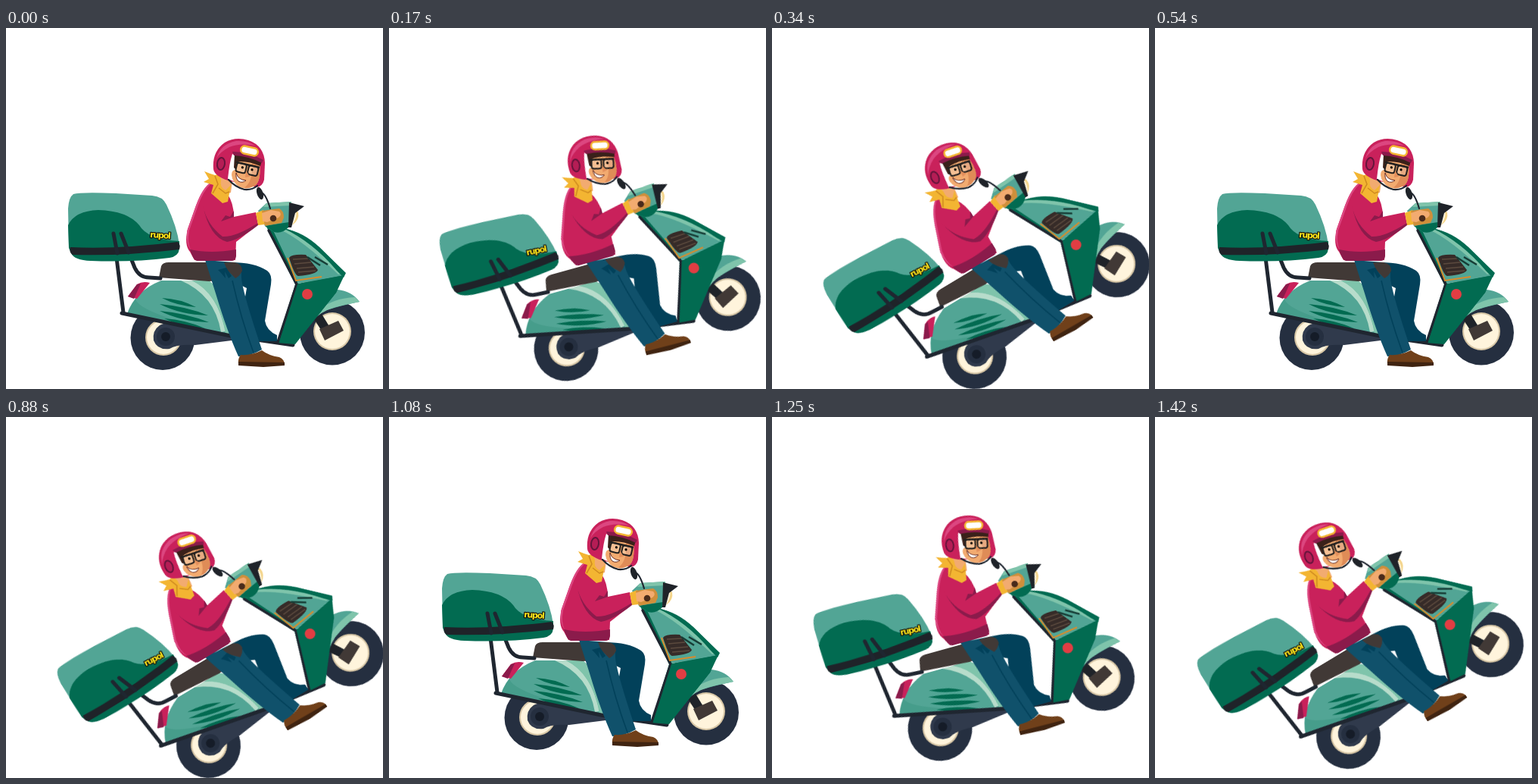
An HTML page that plays this animation: 498x476 px, repeating every 1.62 s.

```html
<!DOCTYPE html>
<html lang="en">
<head>
<meta charset="utf-8">
<title>Delivery scooter</title>
<style>
  html, body { margin: 0; width: 100%; height: 100%; overflow: hidden; background: #fff; }
  svg { display: block; width: 498px; height: 476px; }
  .light { fill: #52a595; } .green { fill: #026b51; } .pale { fill: #7fc4ab; }
  .tyre { fill: #252f40; } .black { fill: #1f2329; } .cream { fill: #fff4dc; }
  .seat { fill: #413936; } .pink { fill: #c9215b; } .plum { fill: #8b1b4b; }
  .rose { fill: #dc4680; } .jeans { fill: #10516b; } .navy { fill: #02415a; }
  .gold { fill: #f3b532; } .skin { fill: #f2ab70; } .tan { fill: #cf8f3b; }
  .line { fill: none; stroke: #1f2630; stroke-width: 5; stroke-linejoin: round; stroke-linecap: round; }
  text { font: 900 11px "DejaVu Sans", sans-serif; fill: #ffe71a; stroke: #16180f; stroke-width: 2.4; paint-order: stroke; stroke-linejoin: round; }
</style>
</head>
<body>
<svg viewBox="0 0 498 476">
<g id="scooter">
  <g id="rear-wheel">
    <circle class="tyre" cx="207" cy="408.5" r="42.5"/>
    <circle cx="208" cy="408" r="24" fill="#d8c7a6"/>
    <circle class="cream" cx="208" cy="408" r="22"/>
    <path fill="#303a4c" d="M203 392Q215 385 235 394L298 402V412L250 418Q225 417 216 423Q200 425 195 412Q193 399 203 392Z"/>
    <circle class="tyre" cx="211" cy="407" r="12"/>
    <circle cx="211" cy="407" r="6" fill="#151c28"/>
  </g>

  <g id="front-wheel">
    <circle class="tyre" cx="431" cy="401.5" r="43"/>
    <circle cx="431" cy="400" r="25" fill="#d8c7a6"/>
    <circle class="cream" cx="431" cy="400" r="23"/>
    <path class="black" d="M407 384L417 377L428 395L418 401Z"/>
    <path class="seat" d="M414 397L439 386L446 399L421 412Z"/>
    <path class="light" d="M396 392Q405 347 438 345Q457 347 467 361Q438 367 424 372Q410 378 400 392Z"/>
    <path class="pale" d="M412 372Q433 356 461 355L467 361Q436 367 424 372Q409 379 400 392Q402 381 412 372Z"/>
  </g>

  <g id="rear-body">
    <path class="light" d="M160 377Q170 347 205 333H268Q294 354 298 406Z"/>
    <path fill="#b7dccb" d="M231 333H246Q279 348 290 400L284 401Q276 352 231 333Z"/>
    <path class="pale" d="M246 333H268Q294 354 298 406L290 403Q281 351 246 333Z"/>
    <path class="green" d="M160 377Q164 366 171 357Q174 376 297 405Z" opacity=".15"/>
    <g class="green">
      <path d="M206 356Q230 357 251 368Q225 366 206 356Z"/>
      <path d="M203 364Q238 367 267 379Q230 378 203 364Z"/>
      <path d="M203 373Q238 376 268 388Q231 387 203 373Z"/>
      <path d="M209 383Q238 385 263 396Q231 394 209 383Z"/>
    </g>
    <path class="pink" d="M161 354L173 338Q181 333 190 336L173 357Z"/>
    <path class="plum" d="M161 354L173 338L178 337L169 357Z"/>
    <path class="seat" d="M202 329L205 314Q207 309 215 309L299 309Q312 311 312 320Q309 329 298 332L268 334Z"/>
    <path d="M285 309H299Q312 311 312 320Q309 329 298 332L285 333Z" fill="#4d423e"/>
    <path class="line" d="M153 376L297 406L379 418"/>
    <path class="line" d="M142 271L155 375"/>
    <path class="line" d="M152 271L170 316Q176 329 189 329L204 330"/>
  </g>

  <g id="box">
    <path class="light" d="M83 287L82 238Q83 223 89 219Q99 216 145 218L193 221Q207 222 212 233Q226 262 229 286Z"/>
    <path class="green" d="M83 290L82 260Q91 241 122 240Q160 241 176 260Q187 279 229 281V291Q228 301 216 303Q168 309 112 307Q90 306 86 297Z"/>
    <path class="black" d="M85 289Q149 292 227 282Q231 286 229 292Q154 301 88 299Q83 296 85 289Z"/>
    <path class="line" d="M142 271L147 297M152 271L162 296"/>
    <text x="190" y="276" transform="rotate(4 190 276)" letter-spacing="-1.2">rupol</text>
  </g>

  <g id="shield">
    <path class="green" d="M342 258L356 262L386 337L447 323L436 349L382 417L358 415L382 338Z"/>
    <path class="light" d="M351 263L368 264Q390 270 414 289L448 323L447 326L386 337Z"/>
    <path class="pale" d="M362 266Q390 278 439 325L447 323L414 289Q390 270 368 264Z"/>
    <path class="green" d="M366 264Q393 269 414 289L449 323L446 329L437 320Q405 282 366 264Z"/>
    <path class="line" style="stroke-width:3.5" d="M347 267L384 338L359 414"/>
    <path class="green" d="M385 338L447 326L436 349L382 416L361 414Z"/>
    <path d="M372 303L383 333L417 328" fill="none" stroke="#d88c2c" stroke-width="2"/>
    <path d="M374 303Q377 298 396 299L412 319Q410 325 386 327Q381 326 374 303Z" fill="#362b28"/>
    <path d="M379 305L399 304M381 311L403 309M384 317L407 315M386 322L409 320" stroke="#5b4a3e" stroke-width="1.3"/>
    <path d="M398 302L415 313M408 302L425 312" stroke="#173d36" stroke-width="2.5"/>
    <circle cx="398" cy="351" r="7" fill="#e23d43"/>
  </g>

  <g id="legs">
    <path class="navy" d="M292 309Q327 308 345 320Q352 325 350 338L342 386Q344 399 358 405V413H329L314 366L318 343L294 331Z"/>
    <path class="jeans" d="M263 306L302 309Q312 316 311 329Q312 347 338 424Q323 433 307 433Q292 400 277 350Z"/>
    <path class="seat" d="M288 309H302Q312 311 312 320Q309 327 303 330L292 319Z"/>
    <path class="navy" d="M280 319L291 316L298 327L294 330L289 321L290 330L284 323Z"/>
    <path d="M299 333Q310 382 327 428" fill="none" stroke="#02415a" stroke-width="1.5"/>
    <path d="M310 431Q324 432 338 425Q347 432 361 434Q368 437 368 444L340 446L307 444Q306 436 310 431Z" fill="#70401a"/>
    <path d="M307 440L368 441V445L340 447L307 445Z" fill="#402411"/>
  </g>

  <g id="headset">
    <path class="light" d="M333 241L344 231L377 229L373 262Q364 272 354 269L342 261Z"/>
    <path class="green" d="M354 259L374 256L373 263Q364 272 354 269L342 261Z"/>
    <path class="pale" d="M344 231L377 229L376 234L340 236Z"/>
    <path class="cream" d="M380 240L386 243Q388 253 378 260Z"/>
    <path d="M383 241L386 243Q388 253 378 260Q385 250 383 241Z" fill="#f4d58b"/>
    <path class="black" d="M374 230L394 235L382 244L377 263L373 263Z"/>
    <path class="line" style="stroke-width:2.2" d="M337 217Q343 218 349 238"/>
    <ellipse class="black" cx="335.500" cy="218" rx="4" ry="8.500" transform="rotate(-18 335.500 218)"/>
  </g>

  <g id="torso">
    <path class="pink" d="M271 203Q260 211 251 234L240 265Q235 286 243 295L249 306H303L304 282Q312 276 333 259L330 243L301 249Q301 231 292 218Z"/>
    <path class="rose" d="M271 205Q260 215 253 236L242 267Q239 283 244 292Q238 286 239 268L251 234Q259 211 271 203Z"/>
    <path class="plum" d="M243 292Q270 298 304 292V301Q303 307 298 307H252Q247 306 243 292Z"/>
    <path class="plum" d="M260 234Q265 259 286 275Q303 276 333 257V260Q309 279 292 282Q269 276 260 234Z"/>
    <path class="plum" d="M301 249L284 255L290 247L296 249L301 241Z"/>
    <path class="gold" d="M330 244L340 240L342 259L333 260Z"/>
    <path class="tan" d="M338 241L361 238Q367 241 367 250L364 257L342 261Z"/>
    <path class="skin" d="M338 244L350 240L361 242Q365 246 360 250L345 256L339 255Z"/>
    <circle cx="353" cy="251" r="4.300" fill="#4a2b1b"/>
  </g>

  <g id="scarf">
    <path class="skin" d="M280 194L299 202L297 217L284 221L278 209Z"/>
    <path class="gold" d="M262 189Q269 192 276 194L282 192L284 201Q282 210 290 214L297 207L293 229L286 231L271 218L274 207L261 203L268 199Z"/>
    <path d="M276 195L280 206L273 218M281 211L290 218L295 216" fill="none" stroke="#cf8a20" stroke-width="1.5"/>
  </g>

  <g id="head">
    <path class="pink" d="M274 186Q272 163 289 151Q303 143 320 148Q341 155 342 178L341 200Q339 209 331 210L293 201Q275 195 274 186Z"/>
    <path class="rose" d="M278 172Q283 153 304 149Q319 148 329 155Q309 151 295 157Q283 163 278 172Z"/>
    <path fill="#fff" d="M299 166L306 170L305 185L303 203L293 199Q295 178 299 166Z"/>
    <path class="skin" d="M304 172L335 179Q337 200 330 207Q320 214 309 210Q299 204 298 194Q298 187 303 187Z"/>
    <path d="M325 178L335 180Q337 200 330 207Q322 212 314 211Q327 203 325 178Z" fill="#df8c57"/>
    <path d="M302 166Q321 165 338 175L336 182Q321 175 305 176L304 187L301 184Z" fill="#3a211a"/>
    <path class="plum" d="M299 163Q321 163 340 174L338 178Q321 169 301 168Z"/>
    <ellipse cx="284" cy="179" rx="5" ry="8" fill="#b51d55" stroke="#65143b" stroke-width="2" transform="rotate(8 284 179)"/>
    <rect x="310" y="157" width="23" height="10" rx="5" fill="#fff" stroke="#f4b532" stroke-width="2.500" transform="rotate(13 321.500 162)"/>
    <g transform="rotate(13 317 186)">
      <path d="M302 180H334" stroke="#22201f" stroke-width="2.500"/>
      <rect x="304" y="180" width="13" height="12" rx="3" fill="#fff" fill-opacity=".25" stroke="#22201f" stroke-width="2"/>
      <rect x="320" y="180" width="13" height="12" rx="3" fill="#fff" fill-opacity=".25" stroke="#22201f" stroke-width="2"/>
      <circle cx="312" cy="185" r="1.600"/><circle cx="325" cy="185" r="1.600"/>
    </g>
    <path d="M317 188L322 196L316 197" fill="#e38f5c"/>
    <path d="M304 191Q306 200 317 201Q312 205 307 202Q303 198 304 191Z" fill="#fff" stroke="#6d2d21" stroke-width="1"/>
    <path class="line" style="stroke-width:2.200" d="M294 200Q303 210 315 213Q325 214 332 208"/>
  </g>
</g>
</svg>
<script>
  // Each pose: start time in ms, rear axle position, lift angle in degrees.
  const loop = 1620, axle = [207, 408.5];
  const poses = [[207, 408.5, 0], [234, 423, -15.5], [267.5, 433.5, -31]];
  const starts = [0, 170, 340, 540, 710, 880, 1080, 1250, 1420];

  const frameAt = (time, i) => {
    const [x, y, angle] = poses[i % 3];
    const shift = i < 6 ? 0 : -12;
    return {
      offset: time / loop,
      easing: "step-end",
      transform: `translate(${x + shift}px, ${y + shift}px) rotate(${angle}deg) translate(${-axle[0]}px, ${-axle[1]}px)`
    };
  };

  const frames = starts.map(frameAt);
  frames.push({ ...frames[frames.length - 1], offset: 1 });
  document.getElementById("scooter").animate(frames, { duration: loop, iterations: Infinity });
</script>
</body>
</html>
```
